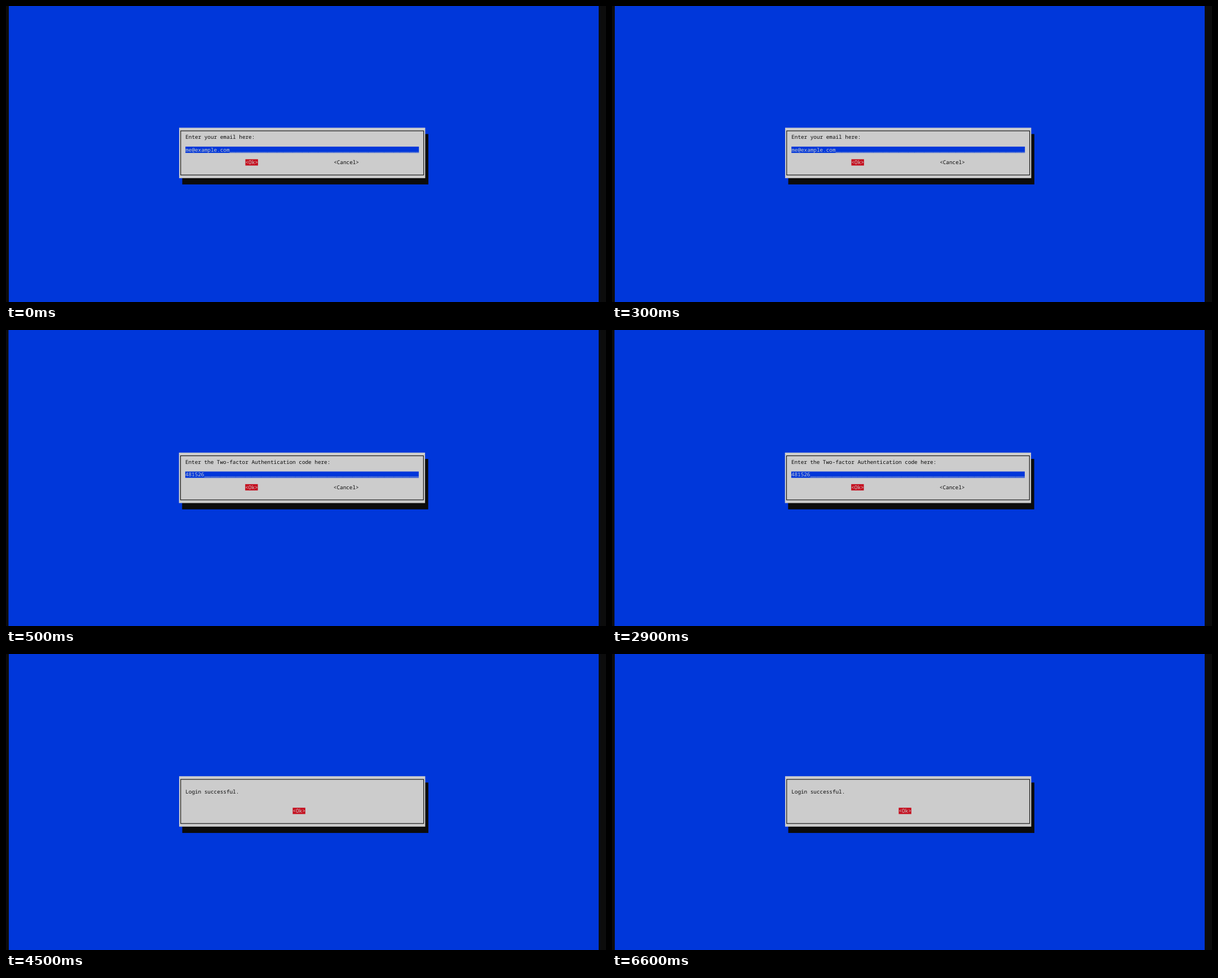
An HTML page with a canvas that plays this animation: 1064 px wide and 526 px high, repeating every 8000 ms.

```html
<!DOCTYPE html>
<html lang="en">
<head>
<meta charset="utf-8">
<title>Terminal login dialogs</title>
<style>
  html, body { margin: 0; height: 100%; overflow: hidden; background: #0c0c0c; }
  canvas { display: block; }
</style>
</head>
<body>
<canvas id="stage" width="1064" height="526"></canvas>
<script>
const ctx = document.getElementById('stage').getContext('2d');
const CELL = 5.595, ROW = 11.2, COLS = 78, ROWS = 8, FIELD = 74, LOOP = 8000;
const BLACK = '#0c0c0c', BLUE = '#0037da', GREY = '#cccccc', RED = '#c50f1f';

const ok = col => ({ col, row: 5, text: '<Ok>', color: GREY, back: RED });
const cancel = { col: 49, row: 5, text: '<Cancel>' };
const label = (text, row) => ({ col: 2, row, text });
const field = text => ({ col: 2, row: 3, text: text.padEnd(FIELD, '_'), color: GREY, back: BLUE });

const dialogs = [
  { start: 0, left: 5, x: 307, y: 216.3,
    items: [label('Enter your email here:', 1), field('me@example.com'), ok(21), cancel] },
  { start: 500, left: 4.4, x: 306.7, y: 217.9,
    items: [label('Enter the Two-factor Authentication code here:', 1), field('481526'), ok(21), cancel] },
  { start: 4500, left: 5, x: 307, y: 217.2,
    items: [label('Login successful.', 2), ok(36)] },
];

function rect(color, x, y, w, h) {
  ctx.fillStyle = color;
  ctx.fillRect(x, y, w, h);
}

// Text sits on the terminal grid, one character per cell.
function drawItem(dialog, { col, row, text, color = BLACK, back }) {
  const x = dialog.x + col * CELL, y = dialog.y + row * ROW;
  if (back) rect(back, x, y, text.length * CELL, ROW);
  ctx.fillStyle = color;
  [...text].forEach((char, i) => ctx.fillText(char, x + i * CELL, y + 8.8));
}

function drawDialog(dialog) {
  const { left, x, y, items } = dialog;
  const w = COLS * CELL, h = ROWS * ROW;
  rect(BLACK, 0, 0, 1064, 526);
  rect(BLUE, left, 0, 1051 - left, 526);
  rect(BLACK, x + CELL, y + ROW, w, h);
  rect(GREY, x, y, w, h);
  ctx.strokeStyle = BLACK;
  ctx.lineWidth = 1.1;
  ctx.strokeRect(x + CELL / 2, y + ROW / 2, w - CELL, h - ROW);
  items.forEach(item => drawItem(dialog, item));
}

function tick() {
  const time = performance.now() % LOOP;
  ctx.font = '500 9.4px "Noto Sans Mono", "DejaVu Sans Mono", monospace';
  ctx.textRendering = 'geometricPrecision';
  drawDialog(dialogs.findLast(dialog => time >= dialog.start));
  requestAnimationFrame(tick);
}
tick();
</script>
</body>
</html>
```
